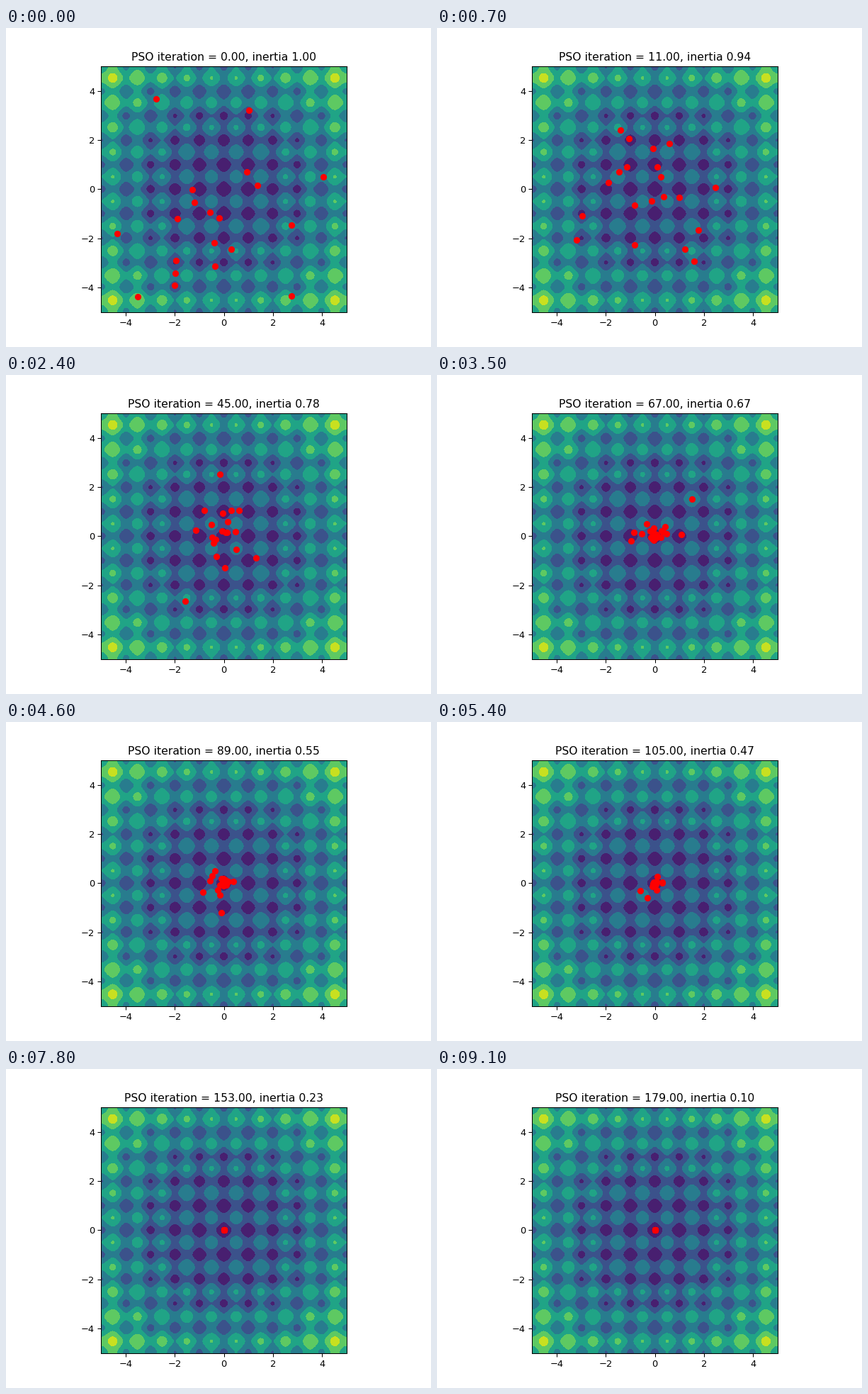
Recreate the animation shown at these times as a matplotlib script. Size 600 by 450 pixels, loop 9200 ms.

```python
import numpy as np
import matplotlib.pyplot as plt
from matplotlib.animation import FuncAnimation

FRAMES, INTERVAL = 92, 100
MAX_ITER = 200
LIMIT = 5.0
SETTLED = 78  # frame by which the swarm has collapsed

plt.rcParams["font.family"] = "DejaVu Sans"

START = np.array([
    (-2.76, 3.67), (1.02, 3.21), (4.06, .5), (.93, .7), (1.38, .15),
    (-1.27, -.02), (-1.2, -.54), (-1.88, -1.21), (-.55, -.95), (-.18, -1.18),
    (2.76, -1.47), (-4.35, -1.81), (-.4, -2.19), (.29, -2.46), (-1.95, -2.92),
    (-.37, -3.14), (-1.98, -3.43), (-2, -3.92), (-3.51, -4.38), (2.77, -4.35)])

rng = np.random.default_rng(4)
kick = rng.normal(0, 1.6, START.shape)
speed = rng.uniform(.4, 1.2, (len(START), 1))  # radians per frame
damping = rng.uniform(1.2, 5, (len(START), 1))


def rastrigin(x, y):
    return 20 + x**2 + y**2 - 10 * (np.cos(2 * np.pi * x) + np.cos(2 * np.pi * y))


def swarm(frame):
    """Each particle swings around the optimum while its orbit shrinks to zero."""
    fade = max(0, 1 - frame / SETTLED) ** damping
    angle = speed * frame
    orbit = START * np.cos(angle) + kick * np.sin(angle)
    return np.clip(fade * orbit, -LIMIT, LIMIT)


fig, ax = plt.subplots(figsize=(6.4, 4.8), dpi=93.75)
grid = np.linspace(-LIMIT, LIMIT, 401)
gx, gy = np.meshgrid(grid, grid)
ax.contourf(gx, gy, rastrigin(gx, gy), levels=np.arange(0, 91, 15))
ax.set_aspect("equal")
ax.set_xticks(range(-4, 5, 2))
ax.set_yticks(range(-4, 5, 2))
ax.set(xlim=(-LIMIT, LIMIT), ylim=(-LIMIT, LIMIT))
dots, = ax.plot([], [], "ro", clip_on=False)
title = ax.set_title("")


def update(frame):
    iteration = max(0, 2 * frame - 3)
    dots.set_data(*swarm(frame).T)
    title.set_text(f"PSO iteration = {iteration:.2f}, "
                   f"inertia {1 - iteration / MAX_ITER:.2f}")
    return dots, title


anim = FuncAnimation(fig, update, frames=FRAMES, interval=INTERVAL,
                     init_func=lambda: update(0), repeat=True, repeat_delay=0)
plt.show()
```
